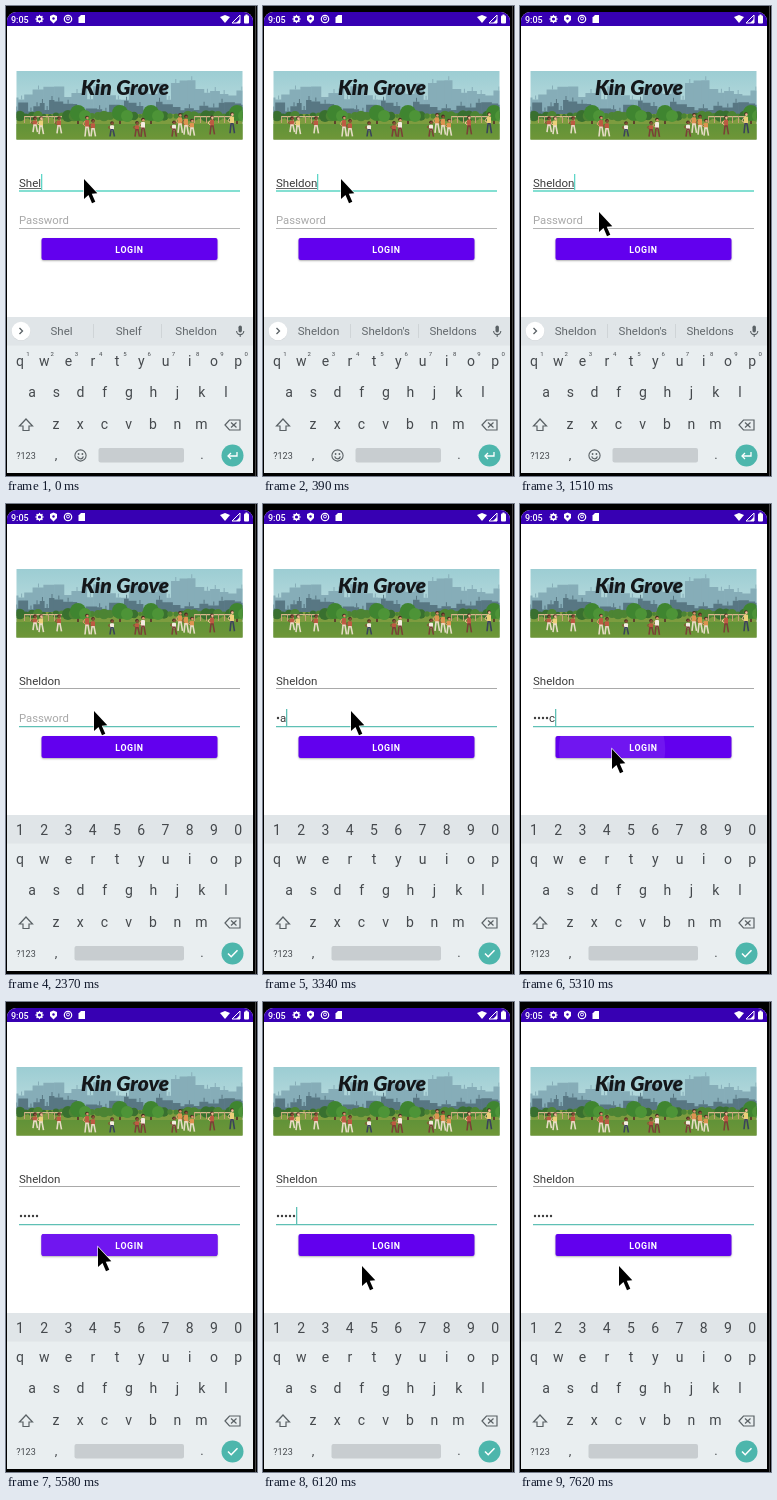
Recreate the animation shown at these times as an HTML page with a canvas. Size 251 by 470 pixels, loop 8000 ms.

```html
<!DOCTYPE html>
<html lang="en">
<head>
<meta charset="utf-8">
<title>Login screen</title>
<style>
html, body { margin: 0; width: 100%; height: 100%; overflow: hidden; background: #000; }
canvas { display: block; width: 251px; height: 470px; }
</style>
</head>
<body>
<canvas id="stage" width="251" height="470"></canvas>
<script>
const LOOP = 8000, BLINK = 530, STEP = 120;
const FOCUS = 1830, KEYS_SWAP = 2000, PRESS = 5190, RELEASE = 5470, FADE = 5580;
const g = document.getElementById('stage').getContext('2d');
const FONT = 'Roboto, "Noto Sans", sans-serif';
const INK = '#45494d', ICON = '#5a6165', TEAL = '#4db6ac', PURPLE = '#6200ee';

const NAME = 'Sheldon', SECRET = 'basic';
const WORDS = ['Shelf', NAME, NAME + "'s", NAME + 's'];
const KEY_TIMES = [2940, 3340, 3900, 3900, 4170];
const NAME_KEY = 123, MASK_DELAY = 1410;

// Pointer legs: start, steps, goal, ease-in power.
const HOME = { x: 78, y: 173 };
const LEGS = [
  { t: 1240, n: 3, x: 79, y: 206, pow: 3 },
  { t: 1630, n: 2, x: 88, y: 207, pow: 1 },
  { t: 4830, n: 5, x: 92, y: 245, pow: 1 },
  { t: 5730, n: 4, x: 99, y: 264, pow: 1 }
];

const clamp = (v, lo = 0, hi = 1) => Math.min(hi, Math.max(lo, v));

function pointerAt(t) {
  let { x, y } = HOME;
  for (const leg of LEGS) {
    const k = clamp((Math.floor((t - leg.t) / STEP) + 1) / leg.n) ** leg.pow;
    x += (leg.x - x) * k;
    y += (leg.y - y) * k;
  }
  return [Math.round(x), Math.round(y)];
}

const typedName = t => NAME.slice(0, 4 + Math.floor(t / NAME_KEY));

function caretOn(t) {
  const resets = [0, 3 * NAME_KEY, FOCUS, ...KEY_TIMES].filter(r => r <= t);
  const base = t >= RELEASE ? RELEASE + BLINK : Math.max(...resets);
  return Math.floor((t - base) / BLINK) % 2 === 0;
}

function rect(x, y, w, h, fill, r = 0) {
  g.fillStyle = fill;
  g.beginPath();
  g.roundRect(x, y, w, h, r);
  g.fill();
}

function disc(x, y, r, fill) {
  g.fillStyle = fill;
  g.beginPath();
  g.arc(x, y, r, 0, Math.PI * 2);
  g.fill();
}

function ring(x, y, r, color, width = 1, from = 0, to = Math.PI * 2) {
  g.strokeStyle = color;
  g.lineWidth = width;
  g.beginPath();
  g.arc(x, y, r, from, to);
  g.stroke();
}

function trace(pts, x, y, close) {
  g.beginPath();
  for (let i = 0; i < pts.length; i += 2) g.lineTo(x + pts[i], y + pts[i + 1]);
  if (close) g.closePath();
}

function shape(pts, x, y, fill) {
  trace(pts, x, y, true);
  g.fillStyle = fill;
  g.fill();
}

function line(pts, x, y, color, width = 1, close = false) {
  trace(pts, x, y, close);
  g.strokeStyle = color;
  g.lineWidth = width;
  g.stroke();
}

function text(s, x, y, size, color, align = 'left', weight = 400) {
  g.font = `${weight} ${size}px ${FONT}`;
  g.textAlign = align;
  g.fillStyle = color;
  g.fillText(s, x, y);
  return g.measureText(s).width;
}

function random(seed) {
  return () => (seed = (seed * 16807) % 2147483647) / 2147483647;
}

function statusBar() {
  rect(1, 6, 246, 14, '#3700b3', [9, 9, 0, 0]);
  text('9:05', 5, 16.5, 9, '#fff', 'left', 500);
  ring(33.5, 13, 2.4, '#fff', 1.6);
  for (let a = 0; a < 6.2; a += Math.PI / 4) disc(33.5 + 3.5 * Math.cos(a), 13 + 3.5 * Math.sin(a), .7, '#fff');
  shape([0, -4.5, 3.5, -3, 3.5, 1, 0, 4.5, -3.5, 1, -3.5, -3], 47.5, 13, '#fff');
  disc(47.5, 12.5, 1.2, '#3700b3');
  ring(62, 13, 3.7, '#fff', 1.2);
  ring(62, 12.5, 1.5, '#fff');
  shape([-1, -4, 3, -4, 3, 4, -3.5, 4, -3.5, -1.5], 76, 13, '#fff');
  shape([0, 4, -5, -2, 0, -4, 5, -2], 219, 13, '#fff');
  line([4, -4, 4, 4, -4, 4], 230, 13, '#fff', 1, true);
  shape([4, 0, 4, 4, 0, 4], 230, 13, '#fff');
  rect(238, 9.5, 5, 8, '#fff', 1);
  rect(239.5, 8.5, 2, 2, '#fff');
}

function skyline(seed, low, high, color) {
  const rnd = random(seed);
  for (let x = 8; x < 238;) {
    const w = 4 + rnd() * 7, h = low + rnd() * (high - low);
    rect(x, 112 - h, w + .5, h, color);
    if (rnd() > .6) rect(x + w / 2, 108 - h, 1, 4, color);
    x += w;
  }
}

function person(x, foot, h, shirt, legs, skin) {
  const top = foot - h, hip = h * .55;
  disc(x, top + 1.6, 1.8, '#4a2a22');
  disc(x + .4, top + 2.2, 1.3, skin);
  rect(x - 2, top + 4, 4, hip - 3, shirt, 1);
  line([-2, 5, -4, h * .4, -1.5, h * .5], x, top, skin);
  line([-2, h, -1, hip, 1, hip, 2.5, h], x, top, legs, 1.6);
}

function crowd() {
  const rnd = random(61);
  const pick = list => list[Math.floor(rnd() * list.length)];
  for (const x of [31, 55, 83, 108, 133, 170, 182, 208, 228]) {
    for (let i = 0; i < 1 + (rnd() > .5); i++) {
      person(x + i * 6 - 2, 126 + rnd() * 5, 15 + rnd() * 6,
        pick(['#ecd07a', '#dd9350', '#f4ece0', '#bd5a42']), pick(['#3a4459', '#e6dcc5', '#7a4136']),
        pick(['#d8966c', '#8c5237', '#f0bd95']));
    }
  }
}

function banner() {
  g.save();
  g.beginPath();
  g.rect(10.5, 65, 226, 68.5);
  g.clip();
  const sky = g.createLinearGradient(0, 65, 0, 100);
  sky.addColorStop(0, '#9ccdd3');
  sky.addColorStop(1, '#b5d9dc');
  rect(10, 65, 227, 69, sky);
  skyline(77, 18, 38, '#86adb8');
  skyline(4129, 6, 18, '#587783');
  rect(10, 108, 227, 26, '#7d9c3f');
  const rnd = random(905);
  for (let x = 8; x < 240; x += 6) disc(x, 110, 2 + rnd() * 4, rnd() > .5 ? '#4c8433' : '#39702f');
  for (const x of [72, 114, 145, 231]) {
    rect(x - 1, 108, 2, 14, '#5f432d');
    disc(x, 107, 8, '#3f8530');
    disc(x + 7, 110, 6, '#4d9437');
  }
  for (const x of [18, 188]) {
    rect(x, 110, 38, 1.2, '#d6b98c');
    for (let i = 0; i < 38; i += 6) rect(x + i, 110, 1, 7, '#c3a277');
  }
  const lawn = g.createLinearGradient(0, 116, 0, 134);
  lawn.addColorStop(0, '#5f9238');
  lawn.addColorStop(1, '#6f9638');
  rect(10, 118, 227, 16, lawn);
  crowd();
  g.restore();

  g.font = 'italic 900 21px Lato, "Open Sans", sans-serif';
  g.textAlign = 'center';
  g.fillStyle = '#14171a';
  g.fillText('Kin Grove', 119, 89);
}

function button(t) {
  g.save();
  g.shadowColor = 'rgba(0,0,0,.3)';
  g.shadowBlur = 2;
  g.shadowOffsetY = 1;
  rect(35.5, 232, 176, 22, PURPLE, 2);
  g.restore();
  if (t > PRESS) {
    // Press ripple spreads from the pointer, then fades.
    g.save();
    g.beginPath();
    g.roundRect(35.5, 232, 176, 22, 2);
    g.clip();
    g.globalAlpha = clamp(1 - (t - FADE - STEP) / 200);
    disc(92, 245, (t - PRESS) * .44, '#7016f0');
    g.restore();
  }
  g.letterSpacing = '0.6px';
  text('LOGIN', 123.5, 246.6, 8.8, '#fff', 'center', 700);
  g.letterSpacing = '0px';
}

function form(t) {
  const inName = t < FOCUS;
  const nameEnd = 13 + text(typedName(t), 13, 180.6, 11.5, '#3c3c3c');
  if (inName) rect(13, 182, nameEnd - 13, 1, '#666');
  rect(13, 184, 221, inName ? 2 : 1, inName ? '#84dfd2' : '#a9a9a9');

  const typed = KEY_TIMES.filter(k => k <= t).length;
  const open = typed && t < KEY_TIMES[typed - 1] + MASK_DELAY;
  const dots = open ? typed - 1 : typed;
  let end = 13 + dots * 4;
  if (!typed) text('Password', 13, 218, 11.3, '#a8a8a8');
  for (let i = 0; i < dots; i++) disc(15 + i * 4, 214, 1.2, '#3c3c3c');
  if (open) end += text(SECRET[typed - 1], end, 218, 11.5, '#3c3c3c');
  rect(13, 222, 221, inName ? 1 : 1.3, inName ? '#b5b5b5' : '#5fc0b5');

  if (caretOn(t)) {
    if (inName) rect(Math.round(nameEnd), 168, 1.3, 16, '#5fd6c8');
    else rect(Math.round(end), 205, 1.3, 17, '#5fc0b5');
  }
  button(t);
}

function keyRow(keys, x, y, size = 14) {
  [...keys].forEach((k, i) => text(k, x + i * 24.25, y, size, INK, 'center'));
}

function suggestions(t) {
  disc(15, 325.5, 9.5, '#d3d7da');
  disc(15, 325, 9.3, '#fff');
  line([-1.5, -3, 1.5, 0, -1.5, 3], 15, 325, ICON, 1.3);
  const typed = typedName(t);
  const hits = WORDS.filter(w => w.startsWith(typed) && w !== typed);
  if (t < FOCUS) [typed, hits[0], hits[1]].forEach((w, i) => text(w, 55.5 + i * 67.3, 329.3, 11.5, '#62686c', 'center'));
  for (const x of [87, 155]) rect(x, 318, 1, 14, '#cfd4d7');
  rect(232.5, 319.5, 3.4, 7, ICON, 1.7);
  ring(234.2, 325, 3.6, ICON, 1.1, 0, Math.PI);
  rect(233.7, 328.5, 1, 2.5, ICON);
}

function keyboard(t) {
  const plain = t < KEYS_SWAP, digits = '1234567890';
  rect(1, 311, 246, 156, '#e9eef0');
  rect(1, 311, 246, 28.5, '#e0e5e8');
  if (plain) {
    suggestions(t);
    keyRow(digits, 22, 350, 6);
  } else keyRow(digits, 14, 330.5);
  keyRow('qwertyuiop', 14, 360);
  keyRow('asdfghjkl', 26, 391);
  keyRow('zxcvbnm', 50, 423);

  line([0, -6, 6.5, 1, 3, 1, 3, 5.5, -3, 5.5, -3, 1, -6.5, 1], 20, 419, ICON, 1.2, true);
  line([-8, 0, -3.5, -5, 7, -5, 7, 5, -3.5, 5], 227, 419, ICON, 1.2, true);
  for (const s of [1, -1]) line([-2, -2.5 * s, 3.5, 2.5 * s], 227, 419, ICON, 1.2);

  text('?123', 20, 453, 9, INK, 'center');
  text(',', 50, 453, 13, INK, 'center');
  text('.', 196, 453, 13, INK, 'center');
  const left = plain ? 92.5 : 68.5;
  rect(left, 442, 178 - left, 14.5, '#c8cdd0', 2);
  disc(226.5, 449.5, 11, TEAL);
  if (plain) {
    ring(74.5, 449.5, 5.6, ICON, 1.1);
    for (const s of [-1, 1]) disc(74.5 + s * 1.9, 448, .9, ICON);
    ring(74.5, 450, 2.8, ICON, 1.1, .15, Math.PI - .15);
    line([4.5, -3, 4.5, 1, -4.5, 1], 226.5, 449, '#fff', 1.3);
    line([-1.5, -2, -4.5, 1, -1.5, 4], 226.5, 449, '#fff', 1.3);
  } else line([-4.5, 0, -1.3, 3.2, 5, -3.3], 226.5, 449.5, '#fff', 1.5);
}

function pointer(t) {
  const [x, y] = pointerAt(t);
  const arrow = [0, 0, 0, 20, 4.5, 16, 8, 24.3, 11.3, 22.8, 7.8, 14.8, 13.3, 14.3];
  line(arrow, x, y, '#fff', 1.2, true);
  shape(arrow, x, y, '#000');
}

function draw(t) {
  rect(0, 0, 251, 470, '#000');
  rect(249, 0, 1, 470, '#444');
  rect(1, 6, 246, 461, '#fff', [9, 9, 3, 3]);
  statusBar();
  banner();
  form(t);
  keyboard(t);
  pointer(t);
}

const start = performance.now();
function tick() {
  draw((performance.now() - start) % LOOP);
  requestAnimationFrame(tick);
}
tick();
</script>
</body>
</html>
```
